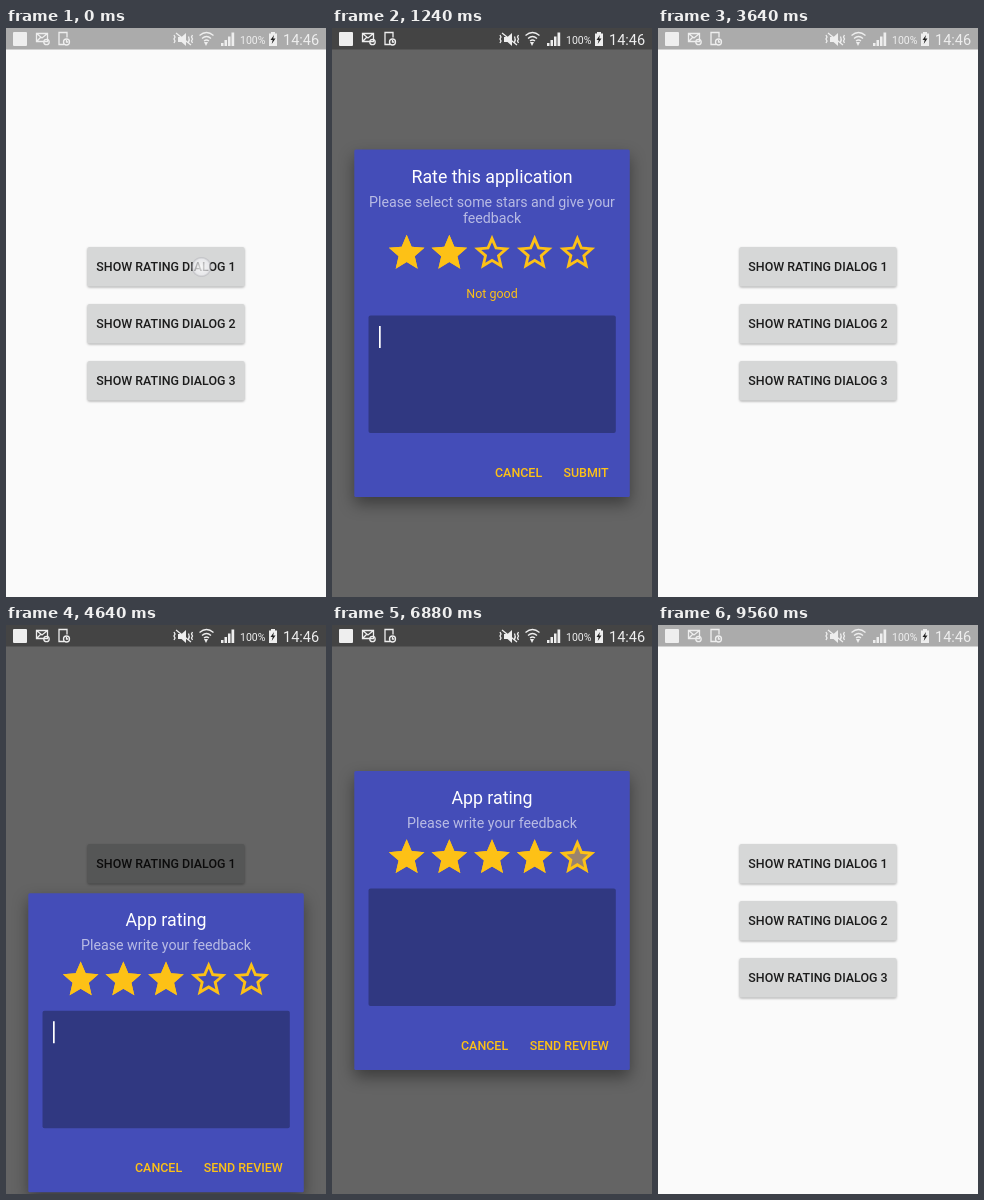
Recreate the animation shown at these times as an HTML page. Size 320 by 569 pixels, loop 9600 ms.

```html
<!DOCTYPE html>
<html lang="en">
<head>
<meta charset="utf-8">
<title>Rating dialogs</title>
<style>
html, body { margin: 0; width: 100%; height: 100%; overflow: hidden; background: #fafafa; }
svg { display: block; width: 320px; height: 569px; font-family: Roboto, sans-serif; }
.btn { font-size: 12.44px; font-weight: 500; }
.title { font-size: 17.78px; fill: #fff; }
.desc { font-size: 14.22px; fill: #b8bbe4; }
.gold { fill: #fdc116; }
.label { font-size: 12.44px; }
.mid { text-anchor: middle; }
.end { text-anchor: end; }
.panel { fill: #444db8; filter: drop-shadow(0 7px 8px rgba(0, 0, 0, .4)); }
.key { fill: #d6d7d7; filter: drop-shadow(0 1px 1px rgba(0, 0, 0, .3)); }
.line { fill: none; stroke: #eee; stroke-width: 1.3; }
</style>
</head>
<body>
<svg id="stage" viewBox="0 0 320 569">
  <defs>
    <path id="full" d="M12 17.27 18.18 21 16.54 13.97 22 9.24 14.81 8.63 12 2 9.19 8.63 2 9.24 7.46 13.97 5.82 21z"/>
    <path id="hollow" d="M22 9.24l-7.19-.62L12 2 9.19 8.63 2 9.24l5.46 4.73L5.82 21 12 17.27 18.18 21l-1.63-7.03zM12 15.4l-3.76 2.27 1-4.28-3.32-2.88 4.38-.38L12 6.1l1.71 4.04 4.38.38-3.32 2.88 1 4.28z"/>
    <radialGradient id="glow">
      <stop offset="0" stop-color="#fff" stop-opacity=".82"/>
      <stop offset=".75" stop-color="#f2f2f6" stop-opacity=".62"/>
      <stop offset=".9" stop-color="#b4b4bc" stop-opacity=".5"/>
      <stop offset="1" stop-color="#aaa" stop-opacity="0"/>
    </radialGradient>
  </defs>
  <rect width="320" height="569" fill="#fafafa"/>
  <rect width="320" height="21.5" fill="#ababab"/>
  <g id="keys"></g>
  <rect id="dim" width="320" height="569"/>
  <g id="dialogs"></g>
  <g id="status" fill="#eee">
    <rect x="7" y="4" width="14" height="14" rx="1"/>
    <path class="line" d="M30.5 5.5h11v8h-11zl5.500 4.500 5.500-4.500M30.500 13.500l4-4"/>
    <circle class="line" cx="40.500" cy="14" r="2.700"/>
    <path class="line" d="M58 16.500h-5v-12h8v5"/>
    <circle class="line" cx="60.500" cy="14" r="3"/>
    <path class="line" d="M60.500 12v2h1.800"/>
    <path d="M172 9h3.500l4.500-4v13l-4.500-4H172z"/>
    <path class="line" d="M170 5l15 12M168 7l1 2-1 2 1 2-1 2M186.500 7l-1 2 1 2-1 2 1 2M182.500 8.500q1.500 3 0 6"/>
    <path class="line" d="M193.500 7.500q7-6 14 0M196 10.500q4.500-4 9 0M198 13q2.500-2 5 0"/>
    <path d="M198 14l2 4 2-4zM215 15h2.500v3H215zM218.500 12h2.500v6h-2.500zM222 8.500h2.500V18H222zM225.500 4.500h2.700V18h-2.700z"/>
    <text x="234" y="15.500" font-size="10.500">100%</text>
    <path d="M265 4h4v1.500h2V18h-8V5.500h2z"/>
    <path d="M268 7l-3.500 5h2.200l-1 4 3.800-5.500h-2.300z" fill="#222"/>
    <text x="277" y="16.500" font-size="14.500">14:46</text>
  </g>
  <circle id="dot" r="10.500" fill="url(#glow)"/>
</svg>
<script>
const LOOP = 9600, SLIDE = 500, DIM = 240, STAR = 300;
const NOTES = ['Very bad', 'Not good', 'Quite ok', 'Very good', 'Excellent !!!'];
const $ = id => document.getElementById(id);
const unit = v => Math.max(0, Math.min(1, v));
const ease = p => .5 - .5 * Math.cos(Math.PI * p);
const starX = i => 53.33 + 42.67 * i;

const dialogs = [
  { top: 121.5, bottom: 469, stars: 203.3, edit: 287.5, title: 'Rate this application',
    desc: ['Please select some stars and give your', 'feedback'], descY: 178.5,
    cancelX: 163, submit: 'SUBMIT', noteY: 269.5, dx: 320, dy: 0,
    open: 280, close: 3120, blink: 220, rates: [[0, 2], [1420, 4], [1880, 5]] },
  { top: 146, bottom: 445, stars: 210.7, edit: 263.5, title: 'App rating',
    desc: ['Please write your feedback'], descY: 202.5,
    cancelX: 129, submit: 'SEND REVIEW', dx: 0, dy: 430,
    open: 4320, close: 8400, blink: 4300, rates: [[0, 3], [5800, 4], [6740, 5]] }
];

// start, end, x, y
const touches = [
  [0, 120, 195.5, 239], [1320, 1420, 202, 225], [1760, 1880, 245, 225], [3000, 3200, 200, 445],
  [4040, 4160, 195.5, 296], [5680, 5800, 202, 231], [6640, 6740, 245, 231], [8280, 8480, 163, 418]
];

const presses = [[40, 0], [4080, 1]];

$('keys').innerHTML = [0, 1, 2].map(i => {
  const y = 219 + 57 * i;
  return `<rect class="key" x="81.500" y="${y}" width="157" height="39.500" rx="1.800"/>
    <rect class="tint" x="81.500" y="${y}" width="157" height="39.500" rx="1.800" opacity="0"/>
    <text class="btn mid" x="160" y="${y + 24.3}" fill="#1c1c1c">SHOW RATING DIALOG ${i + 1}</text>`;
}).join('');
const tints = document.querySelectorAll('.tint');

function build(d) {
  const g = document.createElementNS('http://www.w3.org/2000/svg', 'g');
  const star = (i, kind) =>
    `<use href="#${kind}" class="gold ${kind}" transform="translate(${starX(i)} ${d.stars}) scale(1.778)"/>`;
  const stars = [0, 1, 2, 3, 4].map(i => star(i, 'hollow') + star(i, 'full')).join('');
  const lines = d.desc.map((s, i) => `<text class="desc mid" x="160" y="${d.descY + 16.5 * i}">${s}</text>`).join('');
  const actionY = d.bottom - 20;
  g.innerHTML = `<rect class="panel" x="22.300" y="${d.top}" width="275.500" height="${d.bottom - d.top}" rx="1.500"/>
    <text class="title mid" x="160" y="${d.top + 33}">${d.title}</text>${lines}${stars}
    ${d.noteY ? `<text class="label gold mid note" x="160" y="${d.noteY}"></text>` : ''}
    <rect x="36.500" y="${d.edit}" width="247.300" height="117.500" rx="2" fill="#303881"/>
    <rect class="caret" x="47" y="${d.edit + 10.5}" width="1.700" height="22" fill="#fff"/>
    <text class="btn gold" x="${d.cancelX}" y="${actionY}">CANCEL</text>
    <text class="btn gold end" x="276.700" y="${actionY}">${d.submit}</text>`;
  $('dialogs').append(g);
  d.node = g;
  d.fills = g.querySelectorAll('.full');
  d.note = g.querySelector('.note');
  d.caret = g.querySelector('.caret');
}
dialogs.forEach(build);

function drawDialog(d, t) {
  const shown = t >= d.open && t < d.close + SLIDE;
  d.node.style.display = shown ? '' : 'none';
  if (!shown) return 0;
  const away = 1 - ease(unit((t - d.open) / SLIDE)) + ease(unit((t - d.close) / SLIDE));
  d.node.setAttribute('transform', `translate(${d.dx * away} ${d.dy * away})`);

  const past = d.rates.filter(r => r[0] <= t);
  const [since, rating] = past[past.length - 1];
  const before = past.length > 1 ? past[past.length - 2][1] : rating;
  const mix = unit((t - since) / STAR);
  d.fills.forEach((f, i) => f.setAttribute('opacity', (i < before) * (1 - mix) + (i < rating) * mix));
  if (d.note) d.note.textContent = NOTES[rating - 1];
  d.caret.setAttribute('opacity', (t - d.blink) % 1000 < 500 ? 1 : 0);
  return unit((t - d.open) / DIM) - unit((t - d.close) / DIM);
}

function draw(t) {
  const shade = dialogs.reduce((sum, d) => sum + drawDialog(d, t), 0);
  $('dim').setAttribute('opacity', .6 * shade);
  presses.forEach(([start, i]) => {
    const p = unit((t - start) / 360);
    tints[i].setAttribute('opacity', .1 * Math.sin(Math.PI * p));
  });
  const touch = touches.find(([a, b]) => t >= a && t < b);
  $('dot').style.display = touch ? '' : 'none';
  if (touch) $('dot').setAttribute('transform', `translate(${touch[2]} ${touch[3]})`);
}

const begin = performance.now();
function tick() {
  draw((performance.now() - begin) % LOOP);
  requestAnimationFrame(tick);
}
tick();
</script>
</body>
</html>
```
